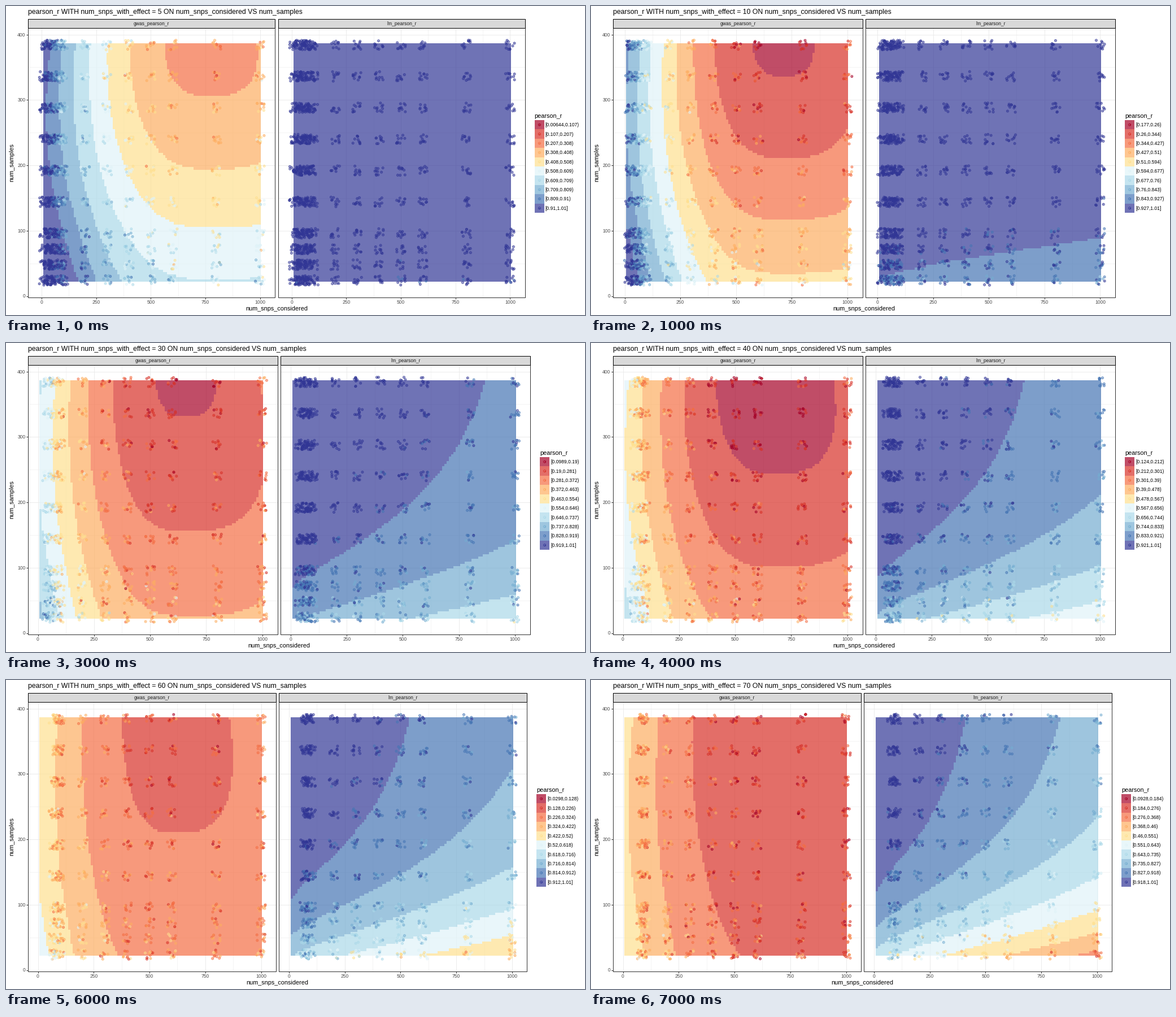
Write a matplotlib script that moves like this. It is 1025x547 px and loops after 8000 ms.

```python
from itertools import starmap

import numpy as np
import matplotlib.pyplot as plt
from matplotlib.animation import FuncAnimation
from matplotlib.patches import Rectangle

W, H, DPI = 1025, 547, 64
PT = 72 / DPI                      # points per pixel
BASE, SMALL, LARGE = 10.85, 8.5, 12.25
TOP, BOTTOM = 66.4, 488            # vertical extent of the tiles
LEFT, STRIP_Y, PANEL_Y, PANEL_END = 39, 23, 39, 516
GAP = 5.4
CELLS = 100
HIGH = 1.01                        # upper end of the last class

HEX = ["#A50026", "#D73027", "#F46D43", "#FDAE61", "#FEE090",
       "#E0F3F8", "#ABD9E9", "#74ADD1", "#4575B4", "#313695"]
PALETTE = np.array([[int(h[i:i + 2], 16) / 255 for i in (1, 3, 5)] for h in HEX])

CONSIDERED = [*range(10, 101, 10), 200, 300, 400, 500, 600, 800, 1000]
SAMPLES = [24, 48, 72, 96, 144, 192, 240, 288, 336, 384]

# panel width, pixel of x = 0, pixels per unit
NARROW = (437.4, 63, 0.3866)
SHIFTED = (442, 59.5, 0.3945)
WIDE = (442, 56.5, 0.397)
MEDIUM = (439, 56.5, 0.395)


class Scene:
    def __init__(self, effect, low, layout, basin, decay):
        self.effect, self.low, self.layout = effect, low, layout
        self.basin, self.decay = basin, decay

    def gwas(self, u, t):
        """A basin hanging from the top edge: centre, width, depth, lowest level."""
        centre, width, depth, level = self.basin
        w = np.abs(u - centre)
        inner = w * (1 - 0.065 * w * np.sin(np.pi * t))
        outer = w / (1 + 0.7 * t)
        x = np.where(u < centre, inner, outer) / width
        return level + (x**2.97 + (t / depth)**1.89)**(1 / 1.35)

    def lm(self, u, t):
        """Falls off to the right and, exponentially, towards the bottom."""
        amount, slope = self.decay
        root = np.sqrt(u)
        fade = np.exp((t - 1) / (0.209 + 0.107 * root))
        return 10 - slope * u - amount * (1 + 0.55 * root) * fade


SCENES = list(starmap(Scene, [
    (5, 0.00644, NARROW, (0.770, 0.317, 0.411, 2.58), (0.3, 0.1)),
    (10, 0.1772, SHIFTED, (0.708, 0.281, 0.420, 0.79), (1.0, 0.13)),
    (20, 0.1122, WIDE, (0.685, 0.294, 0.487, 0.82), (1.4, 0.56)),
    (30, 0.0989, WIDE, (0.655, 0.306, 0.570, 0.84), (1.75, 1.04)),
    (40, 0.1238, WIDE, (0.673, 0.327, 0.558, 0.39), (2.15, 1.36)),
    (50, 0.1182, WIDE, (0.640, 0.342, 0.690, 0.45), (2.5, 1.48)),
    (60, 0.0298, MEDIUM, (0.613, 0.357, 0.900, 1.58), (2.85, 1.64)),
    (70, 0.09276, MEDIUM, (0.714, 0.411, 1.070, 1.02), (3.35, 2.18)),
]))


def classes(level):
    return np.floor(level).astype(int).clip(0, 9)


def y_pixel(value):
    return 513.5 - 1.1575 * value


def text(x, y, s, size, color="black", **kw):
    ax.text(x, y, s, fontsize=size * PT, color=color, family="Liberation Sans", **kw)


def box(x, y, w, h, face, edge="none", z=0):
    ax.add_patch(Rectangle((x, y), w, h, fc=face, ec=edge, lw=PT, zorder=z))


def line(xs, ys, color, width, z=0):
    ax.plot(xs, ys, color=color, lw=width * PT, zorder=z, solid_capstyle="butt")


def rings(x, y, colors):
    ax.scatter(x, y, s=(3.9 * PT)**2, facecolors="none", edgecolors=colors,
               linewidths=0.85 * PT, zorder=4)
    ax.scatter(x, y, s=(1.7 * PT)**2, c=colors, linewidths=0, zorder=4)


def draw_tiles(surface, x0, x1):
    mid = (np.arange(CELLS) + 0.5) / CELLS
    rgb = PALETTE[classes(surface(*np.meshgrid(mid, mid)))]
    rgba = np.dstack([rgb, np.full(rgb.shape[:2], 0.7)])
    ax.imshow(rgba, extent=(x0, x1, BOTTOM, TOP), interpolation="nearest",
              aspect="auto", zorder=2)


def draw_points(effect, surface, is_gwas, zero, scale, x0, x1, rng):
    """Ten jittered runs for every pair of settings."""
    values = [v for v in CONSIDERED if v > effect]
    x, y = (a.ravel().repeat(10) for a in np.meshgrid(values, SAMPLES))
    px, py = zero + x * scale, y_pixel(y)
    u = ((px - x0) / (x1 - x0)).clip(0, 1)
    t = ((py - TOP) / (BOTTOM - TOP)).clip(0, 1)
    level = surface(u, t)
    if is_gwas:
        sigma = 0.65
        level += 0.25 + np.where(x <= 100, (55 - x) / 45, 0)
    else:
        sigma = 0.1 + 0.25 * (10 - level).clip(0, 2)
    level += rng.normal(0, 1, x.size) * sigma * np.where(y < 60, 1.4, 1)
    px += rng.uniform(-8, 8, x.size)
    py += rng.uniform(-8.5, 8.5, x.size)
    order = rng.permutation(x.size)
    rings(px[order], py[order], PALETTE[classes(level)][order])


def draw_panel(scene, name, surface, shift, rng):
    width, zero, scale = scene.layout
    left, zero = LEFT + shift, zero + shift
    right = left + width
    x0, x1 = zero + 7 * scale, zero + 1002 * scale

    for v in range(0, 1001, 125):
        line([zero + v * scale] * 2, [PANEL_Y, PANEL_END], "#EBEBEB", 0.5 if v % 250 else 1)
    for v in range(0, 401, 50):
        line([left, right], [y_pixel(v)] * 2, "#EBEBEB", 0.5 if v % 100 else 1)

    draw_tiles(surface, x0, x1)
    draw_points(scene.effect, surface, shift == 0, zero, scale, x0, x1, rng)

    box(left, PANEL_Y, width, PANEL_END - PANEL_Y, "none", "#333333", 5)
    box(left, STRIP_Y, width, PANEL_Y - STRIP_Y, "#D9D9D9", "black", 5)
    text(left + width / 2, 34, name, SMALL, "#1A1A1A", ha="center", zorder=6)
    for v in range(0, 1001, 250):
        x = zero + v * scale
        line([x, x], [PANEL_END, PANEL_END + 3], "#333333", 1, 5)
        text(x, 527, str(v), SMALL, "#4D4D4D", ha="center")


def draw_legend(scene, x):
    text(x - 0.5, 198, "pearson_r", BASE)
    key = 16.4
    breaks = np.linspace(scene.low, HIGH, 11)
    for i, color in enumerate(PALETTE):
        y = 202 + i * key
        box(x, y, key, key, 0.7 * color + 0.3)
        rings([x + key / 2], [y + key / 2], [color])
        label = f"[{breaks[i]:.3g},{breaks[i + 1]:.3g}{']' if i == 9 else ')'}"
        text(x + 18.5, y + key / 2 + 3, label, SMALL)


def draw(frame):
    scene = SCENES[frame]
    rng = np.random.default_rng(scene.effect)
    width = scene.layout[0]
    ax.clear()
    ax.axis("off")
    draw_panel(scene, "gwas_pearson_r", scene.gwas, 0, rng)
    draw_panel(scene, "lm_pearson_r", scene.lm, width + GAP, rng)
    for v in range(0, 401, 100):
        line([LEFT - 3, LEFT], [y_pixel(v)] * 2, "#333333", 1, 5)
        text(34.5, y_pixel(v) + 3, str(v), SMALL, "#4D4D4D", ha="right")
    end = LEFT + 2 * width + GAP
    text(LEFT, 14, f"pearson_r WITH num_snps_with_effect = {scene.effect} "
         "ON num_snps_considered VS num_samples", LARGE)
    text((LEFT + end) / 2, 539, "num_snps_considered", BASE, ha="center")
    text(13, (PANEL_Y + PANEL_END) / 2, "num_samples", BASE, ha="center",
         rotation=90, rotation_mode="anchor")
    draw_legend(scene, end + 17)
    ax.set_xlim(0, W)
    ax.set_ylim(H, 0)
    return []


fig = plt.figure(figsize=(W / DPI, H / DPI), dpi=DPI, facecolor="white")
ax = fig.add_axes([0, 0, 1, 1])
anim = FuncAnimation(fig, draw, frames=len(SCENES), interval=1000,
                     repeat=True, repeat_delay=0, blit=False)
plt.show()
```
